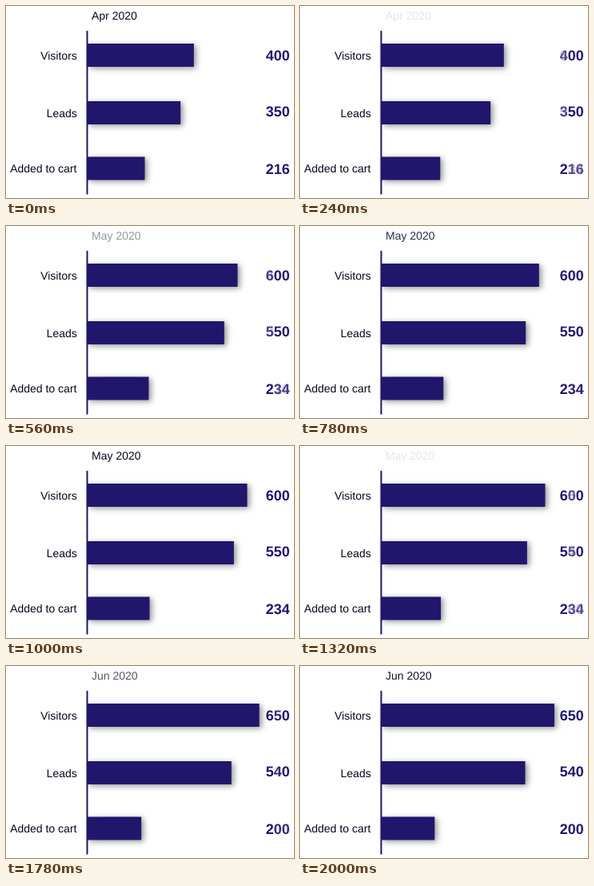
Recreate the animation shown at these times as a matplotlib script. Size 360x240 px, loop 2.1 s.

```python
import math

import matplotlib.pyplot as plt
import numpy as np
from matplotlib.animation import FuncAnimation
from matplotlib.patches import PathPatch, Rectangle
from matplotlib.textpath import TextPath
from matplotlib.transforms import Affine2D

W, H, DPI = 360, 240, 100
LOOP, TICK = 2100, 20
NAVY, INK = "#20176c", "#0a0820"
BAR_X, BAR_H, SCALE = 101.5, 29, 1 / 3

MONTHS = ["Apr 2020", "May 2020", "Jun 2020"]
# label, bar top, label baseline, number baseline, value per month
ROWS = [
    ("Visitors", 47, 67, 68, (400, 600, 650)),
    ("Leads", 119, 139, 138, (350, 550, 540)),
    ("Added to cart", 188.5, 208, 210, (216, 234, 200)),
]

# The picture moves in held steps; each transition spans ten of them.
STEPS = [0, 120, 240, 340, 460, 560, 680, 780, 900, 1000,
         1220, 1320, 1440, 1540, 1660, 1780, 1880, 2000]
GROW = [0, .13, .30, .48, .67, .82, .91, .96, .99, 1]
FADE = [1, .55, .10, 0, .015, .43, .68, .85, .95, 1]

fig = plt.figure(figsize=(W / DPI, H / DPI), dpi=DPI, facecolor="white")
ax = fig.add_axes([0, 0, 1, 1])
ax.axis("off")


def label(s, x, y, size=14, color=INK, weight="normal", right=False):
    path = TextPath((0, 0), s, size=size,
                    prop={"family": "Liberation Sans", "weight": weight})
    if right:
        x -= path.get_extents().x1
    path = path.transformed(Affine2D().scale(1, -1).translate(x, y))
    return ax.add_patch(PathPatch(path, fc=color, lw=0, zorder=4))


def soft_edge(n, lo, hi, sigma=3.8):
    """Blurred box profile sampled at pixel centres."""
    s = sigma * math.sqrt(2)
    return np.array([(math.erf((p + .5 - lo) / s) - math.erf((p + .5 - hi) / s)) / 2
                     for p in range(n)])


shadow_rows = [soft_edge(H, top + 2, top + BAR_H + 2) for _, top, *_ in ROWS]
rgba = np.zeros((H, W, 4))
shadow = ax.imshow(rgba, extent=(0, W, H, 0), aspect="auto",
                   interpolation="nearest", zorder=1)
ax.set(xlim=(0, W), ylim=(H, 0))

ax.add_patch(Rectangle((100.5, 31), 2, 204.5, fc=NAVY, lw=0, snap=False, zorder=3))
titles = [label(m, 107, 17) for m in MONTHS]
bars, digits = [], []
for name, top, base, num_base, values in ROWS:
    label(name, 88.3, base, right=True)
    bars.append(ax.add_patch(Rectangle((BAR_X, top), 0, BAR_H, fc=NAVY, lw=0,
                                       snap=False, zorder=2)))
    digits.append([[label(c, 324.7 + 10 * i, num_base, 18, NAVY, "bold")
                    for i, c in enumerate(str(v))] for v in values])


def draw(frame):
    step = int(np.searchsorted(STEPS, frame * TICK, side="right")) - 1
    # the rest step between the transitions has no change of its own
    old, k = (0, step) if step < 10 else (1, step - 9)
    new, p = old + 1, GROW[k]

    for m, title in enumerate(titles):
        title.set_alpha(FADE[k] if m == (old if k < 4 else new) else 0)

    cover = np.zeros((H, W))
    for bar, nums, profile, (*_, values) in zip(bars, digits, shadow_rows, ROWS):
        width = SCALE * (values[old] + p * (values[new] - values[old]))
        bar.set_width(width)
        across = soft_edge(W, BAR_X + 3, BAR_X + width + 3)
        cover += np.outer(profile, across)
        a, b = str(values[old]), str(values[new])
        for m, glyphs in enumerate(nums):
            for i, glyph in enumerate(glyphs):
                same = a[i] == b[i]
                if m == old:
                    glyph.set_alpha(1 if same else 1 - p)
                else:
                    glyph.set_alpha(p if m == new and not same else 0)

    rgba[..., 3] = .42 * np.clip(cover, 0, 1)
    shadow.set_data(rgba)
    return [shadow, *bars, *titles]


anim = FuncAnimation(fig, draw, frames=LOOP // TICK, interval=TICK,
                     repeat=True, repeat_delay=0, blit=False)
plt.show()
```
